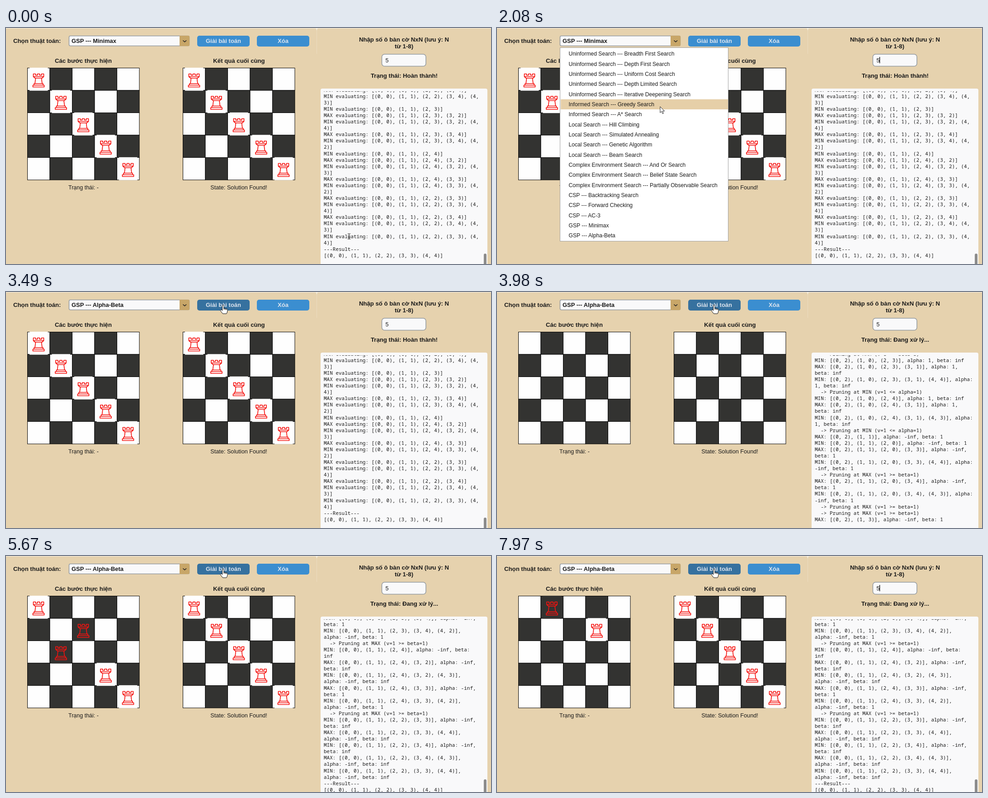
Recreate the animation shown at these times as an HTML page. Size 1073 by 522 pixels, loop 8000 ms.

```html
<!DOCTYPE html>
<html lang="vi">
<head>
<meta charset="utf-8">
<title>Rook search</title>
<style>
  html, body { margin: 0; width: 100%; height: 100%; overflow: hidden; background: #e6d2ae; }
  svg { display: block; width: 100%; height: 100%; }
  text { font-family: "Liberation Sans", sans-serif; fill: #1a1a1a; white-space: pre; }
  #log text { font: 11px "Noto Sans Mono", monospace; }
</style>
</head>
<body>
<svg id="stage" viewBox="0 0 1073 522"></svg>
<script>
const LOOP = 8000, N = 5, CELL = 49.5, LINE = 14.08;
const MENU_OPEN = 1860, MENU_CLOSE = 2710, CLICK = 3640;
const LOG_START = 3668, LOG_RATE = 0.36, STEPS_START = 4508, STEP_MS = 69;

// ---- Searches that fill the log and the step list ----
const columns = [...Array(N).keys()];
const free = s => columns.filter(c => !s.includes(c));
const show = s => '[' + s.map((c, r) => `(${r}, ${c})`).join(', ') + ']';
const num = v => String(v).replace('Infinity', 'inf');

function greedy(evaluate) {
  const s = [];
  while (s.length < N) {
    const options = free(s);
    options.forEach(c => evaluate([...s, c]));
    s.push(options[0]);
  }
  return ['---Result---', show(s)];
}

const minimaxLog = [];
function minimax(s) {
  minimaxLog.push(`${s.length % 2 ? 'MIN' : 'MAX'} evaluating: ${show(s)}`);
  free(s).forEach(c => minimax([...s, c]));
}
minimaxLog.push(...greedy(minimax));

const pruneLog = [], steps = [];
function alphaBeta(s, isMin = true, a = -Infinity, b = Infinity) {
  const name = isMin ? 'MIN' : 'MAX';
  pruneLog.push(`${name}: ${show(s)}, alpha: ${num(a)}, beta: ${num(b)}`);
  steps.push(s);
  if (s.length === N) return 1;
  let v = isMin ? Infinity : -Infinity;
  for (const c of free(s)) {
    const r = alphaBeta([...s, c], !isMin, a, b);
    v = isMin ? Math.min(v, r) : Math.max(v, r);
    if (isMin ? v <= a : v >= b) {
      pruneLog.push(`  -> Pruning at ${name} (v=${v} ${isMin ? `<= alpha=${a}` : `>= beta=${b}`})`);
      break;
    }
    if (isMin) b = Math.min(b, v); else a = Math.max(a, v);
  }
  return v;
}
pruneLog.push(...greedy(alphaBeta));

function wrap(entry, width) {
  const lines = [];
  let line = null;
  for (const word of entry.split(' ')) {
    if (line === null) line = word;
    else if (line.length + 1 + word.length <= width) line += ' ' + word;
    else { lines.push(line); line = word; }
  }
  return [...lines, line];
}

// ---- Drawing helpers ----
const escape = s => s.replace(/[<>&]/g, c => `&#${c.charCodeAt(0)};`);
const text = (x, y, s, size = 13.2, extra = 'font-weight="700"') =>
  `<text x="${x}" y="${y}" font-size="${size}" ${extra}>${escape(s)}</text>`;
const centred = (x, y, s, size, weight = 700, extra = '') =>
  text(x, y, s, size, `font-weight="${weight}" text-anchor="middle" ${extra}`);
const rect = (x, y, w, h, fill, extra = '') =>
  `<rect x="${x}" y="${y}" width="${w}" height="${h}" fill="${fill}" ${extra}/>`;
const shade = (r, c) => (r + c) % 2 ? '#333331' : '#fefefe';

const board = x => columns.map(r => columns.map(c =>
  rect(x + c * CELL, 88.5 + r * CELL, CELL, CELL, shade(r, c), 'stroke="#000"')).join('')).join('');

const rooks = (x, s) => s.map((c, r) => {
  const cx = x + c * CELL, cy = 88.5 + r * CELL;
  return rect(cx + 4.5, cy - 0.7, 40.5, CELL + 1.4, shade(r, c)) +
    `<use href="#rook" x="${cx + 24.5}" y="${cy + 27}"/>`;
}).join('');

const button = (id, x, label) => rect(x, 17, 116, 24, '#3b8ed0', `id="${id}" rx="5"`) +
  centred(x + 58, 33, label, 13, 700, 'style="fill:#dce4ee"');

const menuItems = [
  ...['Breadth First', 'Depth First', 'Uniform Cost', 'Depth Limited', 'Iterative Deepening']
    .map(n => `Uninformed Search --- ${n} Search`),
  'Informed Search --- Greedy Search', 'Informed Search --- A* Search',
  ...['Hill Climbing', 'Simulated Annealing', 'Genetic Algorithm', 'Beam Search']
    .map(n => `Local Search --- ${n}`),
  ...['And Or', 'Belief State', 'Partially Observable']
    .map(n => `Complex Environment Search --- ${n} Search`),
  'CSP --- Backtracking Search', 'CSP --- Forward Checking', 'CSP --- AC-3',
  'GSP --- Minimax', 'GSP --- Alpha-Beta'
];
const ROW = 22.33;

stage.innerHTML = `
<defs>
  <g id="rook" fill="none" stroke="#f5120f" stroke-width="1.7" stroke-linejoin="round">
    <path d="M-11.5-14h5v3h4v-3h5v3h4v-3h5v6l-4 3.5h-15l-4-3.5z M-11.5-8h23
      M-6.5-4.5L-8 7.5H8L6.5-4.5 M-10 11V7.5H10V11 M-12.5 11h25v4h-25z"/>
  </g>
  <clipPath id="logClip"><rect x="696" y="140" width="360" height="382"/></clipPath>
</defs>
${rect(0, 0, 1073, 522, '#e6d2ae')}
${rect(0, 0, 1073, 1, '#f6efe2')}
${rect(687, 1, 1, 56, '#ecdcc0')}
<path d="M684 1h7q-3 0-3 4h-1q0-4-3-4z" fill="#f6efe2"/>
${text(16, 33, 'Chọn thuật toán:')}
${rect(139.5, 17.5, 266, 22, '#f9f9fa', 'rx="3" stroke="#979da2" stroke-width="1.6"')}
<path id="arrow" d="M384 17h19q3 0 3 3v17q0 3-3 3h-19z" fill="#c8a668"/>
<path d="M391.5 27.5l3.8 3.3 3.8-3.3" fill="none" stroke="#222" stroke-width="1.6"/>
${text(145, 33, '', 12.95, 'font-weight="700" id="choice"')}
${button('solve', 423, 'Giải bài toán')}${button('clear', 555, 'Xóa')}
${centred(171, 77, 'Các bước thực hiện')}${centred(515.5, 77, 'Kết quả cuối cùng')}
${board(47.5)}${board(391.5)}
<g id="left"></g><g id="right"></g>
${centred(171.5, 357, 'Trạng thái: -', 12.5, 400)}
${centred(515, 357, 'State: Solution Found!', 12.7, 400)}
${centred(880.5, 30, 'Nhập số ô bàn cờ NxN (lưu ý: N')}${centred(880.5, 45, 'từ 1-8)')}
${rect(831.5, 58, 97.5, 26.5, '#f9f9fa', 'rx="6" stroke="#979da2" stroke-width="1.6"')}
${text(839.5, 76, '5', 12.5, '')}
${rect(846, 64, 1.3, 14, '#000', 'id="caret"')}
${centred(881, 110, '', 13.2, 700, 'id="status"')}
<path d="M696 522V138q0-4 4-4h361q4 0 4 4v384z" fill="#f9f9fa"/>
<g id="log" clip-path="url(#logClip)"></g>
${rect(1057, 499, 6, 40, '#8c8c8c', 'id="thumb" rx="3"')}
<g id="menu">
  ${rect(139.5, 43.5, 372, 428, '#fff', 'stroke="#a0a0a0"')}
  ${rect(141, 0, 370, ROW, '#e6cfa8', 'id="hover"')}
  ${menuItems.map((s, i) => text(158.5, 61.3 + i * ROW, s, 12.1, '')).join('')}
</g>
<g id="mouse">
  <circle id="halo" r="10" fill="#f0dc1e" opacity=".75"/>
  <path id="pointer" d="M0 0v13.5l3.2-3 2.2 5.3 2.2-.9-2.2-5.1h4.4z" fill="#fff" stroke="#111" stroke-width=".9"/>
  <path id="ibeam" d="M-3-6h2.2l.8.8.8-.8H3 M0-5V5 M-3 6h2.2l.8-.8.8.8H3" fill="none" stroke="#111"/>
  <path id="hand" d="M-2.5 11V.5q0-2 1.7-2t1.7 2V6l6.3 1.4q2 .6 2 2.6l-.9 5-1.5 3H-1.5l-5-6.5q-.7-2 1-2.5 1.3 0 3 2z
    M.9 6v3 M3.6 7v2.5 M6.2 7.5V10" fill="#fff" stroke="#111" stroke-width="1"/>
</g>`;

// ---- Timeline ----
const path = [
  [0, 759, 461], [530, 759, 461], [1150, 500, 4], [1300, 446, 5], [1580, 403, 22],
  [1860, 403, 22], [2500, 281, 462], [2700, 281, 462], [2990, 441, 66],
  [3060, 441, 49], [3140, 441, 49], [3350, 481, 30], [LOOP, 481, 30]
];
const clicks = [[1720, 1860], [2570, 2710], [3500, CLICK]];

function mouseAt(t) {
  const i = path.findIndex(p => p[0] > t);
  const [t0, x0, y0] = path[i - 1], [t1, x1, y1] = path[i];
  const k = (t - t0) / (t1 - t0);
  return [x0 + (x1 - x0) * k, y0 + (y1 - y0) * k];
}

function caretOn(t) {
  if (t < 70 || (t > 3370 && t < 4010)) return false;
  return (t - (t < 4000 ? 70 : 4010)) % 900 < 600;
}

const el = id => document.getElementById(id);
const visible = (id, on) => el(id).setAttribute('visibility', on ? 'inherit' : 'hidden');
const set = (id, name, value) => el(id).setAttribute(name, value);

const cache = {};
function refresh(id, key, make) {
  if (cache[id] === key) return;
  cache[id] = key;
  el(id).innerHTML = make();
}

function logLines(entries, width, lastY) {
  const lines = entries.slice(-30).flatMap(e => wrap(e, width));
  const top = lines.length < 27 ? 153 : lastY - (lines.length - 1) * LINE;
  return lines.map((s, i) => `<text x="703" y="${(top + i * LINE).toFixed(2)}">${escape(s)}</text>`).join('');
}

function draw(t) {
  const running = t >= CLICK;
  const count = Math.max(0, Math.min(pruneLog.length, Math.floor((t - LOG_START) * LOG_RATE)));
  const done = running && count === pruneLog.length;
  const step = Math.floor((t - STEPS_START) / STEP_MS);

  el('choice').textContent = 'GSP --- ' + (t < MENU_CLOSE ? 'Minimax' : 'Alpha-Beta');
  el('status').textContent = 'Trạng thái: ' + (running ? 'Đang xử lý...' : 'Hoàn thành!');
  visible('caret', caretOn(t));

  refresh('left', running ? step : 'full', () =>
    rooks(47.5, !running ? columns : step < 0 ? [] : steps[step]));
  refresh('right', !running || done, () => rooks(391.5, !running || done ? columns : []));
  refresh('log', running ? count : 'old', () => !running
    ? logLines(minimaxLog, 52, 506.8)
    : logLines(pruneLog.slice(0, count), done ? 52 : 53, done ? 520.8 : 506.8));
  visible('thumb', !running || done);
  set('thumb', 'y', done ? 494 : 499);

  const [x, y] = mouseAt(t);
  const menuOpen = t >= MENU_OPEN && t < MENU_CLOSE;
  const inBar = y > 17 && y < 41 && !menuOpen;
  const onSolve = inBar && x > 423 && x < 539, onClear = inBar && x > 555 && x < 671;
  const onLog = x > 696 && y > 134;
  const row = Math.floor((y - 46) / ROW);
  visible('menu', menuOpen);
  visible('hover', menuOpen && row >= 0);
  set('hover', 'y', 46 + Math.min(row, menuItems.length - 1) * ROW);
  set('arrow', 'fill', inBar && x > 384 && x < 406 ? '#b08968' : '#c8a668');
  set('solve', 'fill', onSolve ? '#36719f' : '#3b8ed0');
  set('clear', 'fill', onClear ? '#36719f' : '#3b8ed0');

  set('mouse', 'transform', `translate(${x.toFixed(1)} ${y.toFixed(1)})`);
  visible('halo', clicks.some(([a, b]) => t >= a && t < b));
  visible('hand', onSolve || onClear);
  visible('ibeam', onLog);
  visible('pointer', !onSolve && !onClear && !onLog);
}

const start = performance.now();
function tick() {
  draw((performance.now() - start) % LOOP);
  requestAnimationFrame(tick);
}
tick();
</script>
</body>
</html>
```
